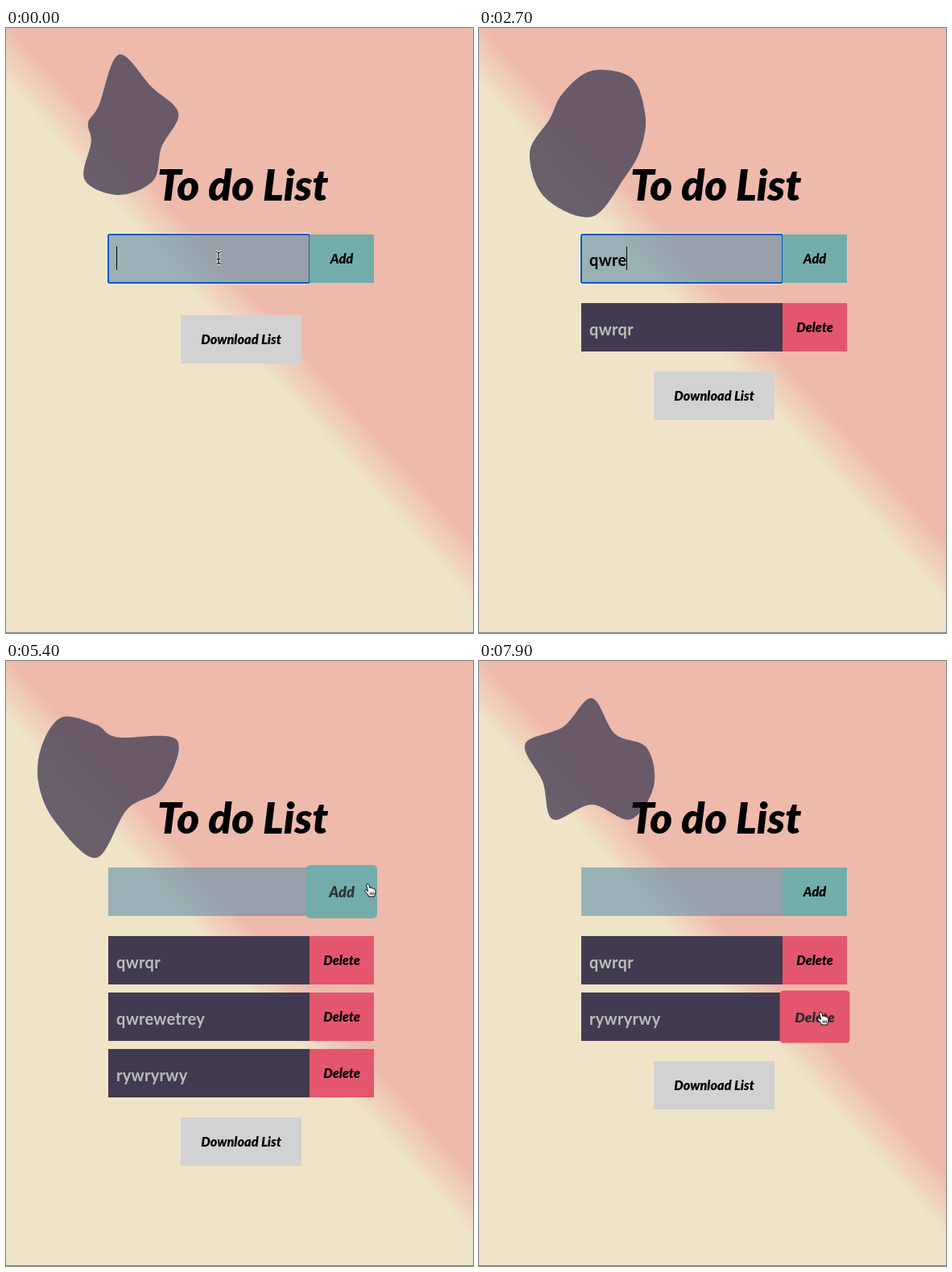
An HTML page for the animation above (8 s loop, 580 by 750 pixels).

```html
<!DOCTYPE html>
<html lang="en">
<head>
<meta charset="utf-8">
<title>To do List</title>
<style>
  html, body { margin: 0; width: 100%; height: 100%; overflow: hidden; }
  svg { display: block; width: 580px; height: 750px; }
  text { font-family: Lato, "Open Sans", sans-serif; font-weight: 700; }
  .title { font-size: 53px; font-weight: 900; font-style: italic; text-anchor: middle; }
  .label { font-size: 16.3px; font-weight: 900; font-style: italic; text-anchor: middle; }
  .entry { font-size: 20px; letter-spacing: .3px; }
</style>
</head>
<body>
<svg viewBox="0 0 580 750">
  <defs>
    <linearGradient id="sky" gradientUnits="userSpaceOnUse" x1="312" y1="337" x2="272" y2="373">
      <stop stop-color="#eebaac"/>
      <stop offset="1" stop-color="#f0e4c8"/>
    </linearGradient>
  </defs>
  <rect width="580" height="750" fill="url(#sky)"/>
  <rect y="749" width="580" height="1" fill="#85828b"/>
  <path id="blob" fill="rgb(82,73,92)" fill-opacity=".85"/>
  <text class="title" x="294" y="214">To do List</text>
  <rect x="127" y="256" width="250" height="60" fill="rgb(95,143,167)" fill-opacity=".6"/>
  <g id="ui"></g>
</svg>
<script>
const LOOP = 8000, TRAVEL = 350, FADE = 150, REMOVED = 7780;
const blob = document.getElementById('blob');
const ui = document.getElementById('ui');
const pen = document.createElement('canvas').getContext('2d');
pen.font = '700 20px Lato, "Open Sans", sans-serif';

// The blob is a ring of evenly spaced spokes, the first one pointing up.
const pose = (time, x, y, ...spokes) => ({ time, values: [x, y, ...spokes] });
const poses = [
  pose(0, 140, 130, 97, 70, 78, 56, 73, 77, 72, 36, 40, 42),
  pose(1400, 140, 130, 83, 95, 83, 72, 76, 68, 72, 45, 45, 43),
  pose(2700, 140, 130, 77, 84, 70, 64, 69, 104, 99, 81, 55, 61),
  pose(4000, 120, 140, 36, 85, 67, 70, 88, 52, 64, 58, 31, 28),
  pose(5400, 112, 130, 51, 44, 105, 87, 66, 114, 86, 75, 72, 74),
  pose(6900, 150, 140, 73, 68, 117, 112, 76, 54, 70, 95, 101, 61),
  pose(7900, 140, 130, 84, 49, 72, 81, 82, 48, 82, 64, 87, 60)
];

const jobs = [
  { text: 'qwrqr', focus: 0, start: 300, step: 150, submit: 1550 },
  { text: 'qwrewetrey', focus: 2120, start: 2270, step: 110, submit: 3640, removed: REMOVED },
  { text: 'rywryrwy', focus: 4150, start: 4250, step: 80, submit: 5320 }
];

// The pointer rests at each stop and leaves just in time for the next.
const stop = (arrive, x, y) => ({ arrive, x, y });
const stops = [
  stop(0, 264, 285), stop(1250, 388, 306), stop(2100, 300, 290), stop(3620, 410, 290),
  stop(4000, 323, 271), stop(5300, 452, 284), stop(6200, 291, 597), stop(7300, 427, 443)
];

const lerp = (a, b, u) => a + (b - a) * u;
const clamp = v => Math.max(0, Math.min(1, v));
const activeJob = t => jobs.find(j => t >= j.focus && t < j.submit);
const rowsAt = t => jobs.filter(j => t >= j.submit && t < (j.removed ?? LOOP));

function poseAt(t) {
  const last = poses.length - 1;
  if (t >= poses[last].time) return poses[last].values;
  const i = poses.findIndex((p, k) => t < poses[k + 1].time);
  const a = poses[i], b = poses[i + 1];
  const before = poses[Math.max(0, i - 1)], after = poses[Math.min(last, i + 2)];
  const span = b.time - a.time, u = (t - a.time) / span;
  return a.values.map((p, k) => {
    const q = b.values[k];
    const m = (q - before.values[k]) / (b.time - before.time) * span;
    const n = (after.values[k] - p) / (after.time - a.time) * span;
    return p + u * (m + u * (3 * (q - p) - 2 * m - n + u * (2 * (p - q) + m + n)));
  });
}

function blobPath([cx, cy, ...spokes]) {
  const count = spokes.length;
  const points = spokes.map((r, k) => {
    const angle = 2 * Math.PI * k / count;
    return [cx + r * Math.sin(angle), cy - r * Math.cos(angle)];
  });
  const at = k => points[(k + count) % count];
  const handle = (k, side) => at(k).map((v, j) => v + side * (at(k + 1)[j] - at(k - 1)[j]) / 6);
  return `M${at(0)}` + points.map((p, k) => `C${handle(k, 1)} ${handle(k + 1, -1)} ${at(k + 1)}`).join('') + 'Z';
}

function pointerAt(t) {
  const past = stops.filter(s => s.arrive <= Math.max(0, t));
  const from = past[past.length - 1], to = stops[past.length] ?? from;
  const u = clamp((t - to.arrive + TRAVEL) / TRAVEL), ease = u * u * (3 - 2 * u);
  const job = activeJob(t);
  return {
    x: lerp(from.x, to.x, ease),
    y: lerp(from.y, to.y, ease),
    hidden: job && t >= job.start && from.arrive <= job.start && t < to.arrive - TRAVEL
  };
}

function buttonsAt(t) {
  const rows = rowsAt(t);
  return [
    { id: 'add', label: 'Add', x: 417, y: 286, width: 80, color: '#72adab' },
    ...rows.map((row, i) =>
      ({ id: row.text, label: 'Delete', x: 417, y: 371 + 70 * i, width: 80, color: '#e4566e' })),
    { id: 'download', label: 'Download List', x: 292, y: 386 + 70 * rows.length, width: 150, color: '#d2d2d2' }
  ];
}

function hoveredAt(t) {
  const { x, y, hidden } = pointerAt(t);
  const hit = b => Math.abs(x - b.x) < b.width / 2 && Math.abs(y - b.y) < 30;
  return hidden ? undefined : buttonsAt(t).find(hit)?.id;
}

// Share of the last moments that the pointer spent on a button.
function hoverAmount(id, t) {
  const samples = 15;
  let hits = 0;
  for (let k = 0; k < samples; k++) hits += hoveredAt(t - FADE * k / samples) === id;
  return hits / samples;
}

function drawButton({ id, label, x, y, width, color }, t) {
  const hover = hoverAmount(id, t), shade = Math.round(51 * hover);
  return `<g transform="translate(${x} ${y}) scale(${1 + .1 * hover})">
    <rect x="${-width / 2}" y="-30" width="${width}" height="60" rx="${4.5 * hover}" fill="${color}"/>
    <text class="label" y="6" fill="rgb(${shade},${shade},${shade})">${label}</text></g>`;
}

function drawInput(t) {
  const job = activeJob(t);
  if (!job) return '';
  const count = Math.max(0, Math.min(job.text.length, Math.floor((t - job.start) / job.step) + 1));
  const typed = job.text.slice(0, count);
  const lastKey = count ? job.start + (count - 1) * job.step : job.focus;
  const caretX = Math.round(137 + pen.measureText(typed).width + count * .3);
  const caretOn = (t - lastKey) % 1060 < 530;
  return `<rect x="125.5" y="254.5" width="253" height="63" rx="3.5" fill="none" stroke="#fff" stroke-opacity=".7"/>
    <rect x="127" y="256" width="250" height="60" rx="2" fill="none" stroke="#0857c3" stroke-width="2"/>
    <text class="entry" x="137" y="295">${typed}</text>` +
    (caretOn ? `<rect x="${caretX}" y="271" width="1" height="29"/>` : '');
}

const drawRow = (row, i) =>
  `<rect x="127" y="${341 + 70 * i}" width="250" height="60" fill="#423a50"/>
  <text class="entry" x="137" y="${381 + 70 * i}" fill="#b9bfb6">${row.text}</text>`;

const beam = 'M-3.5-7.5Q0-7.5 0-5Q0-7.5 3.5-7.5M0-5V5M-2 1.5H2M-3.5 7.5Q0 7.5 0 5Q0 7.5 3.5 7.5';
const cursors = {
  beam: `<path d="${beam}" fill="none" stroke="#fff" stroke-width="3"/>
    <path d="${beam}" fill="none" stroke="#000" stroke-width="1.2"/>`,
  hand: `<path d="M-4-7C-2.8-8.6-1.5-7.6-1-6L0-2.5C1-3.8 2.4-3.2 2.7-2C3.8-2.8 4.8-2 5-1C6-1.5 6.8-.7 6.9.5
    C7.2 3 6.4 5 5.5 8H-1.5C-2 5.5-5 3.5-6.3 1.3C-6.9 0-5.2-.9-4 .3L-2.5 1.5L-4.2-5Z"
    fill="#fff" stroke="#000" stroke-linejoin="round"/>
    <path d="M.3 2.5V6M2.3 2.5V6M4.3 2.5V6" stroke="#000" stroke-width=".9"/>`,
  arrow: '<path d="M-5-8V6L-1.8 3L.3 8L2.6 7L.5 2.3H5Z" stroke="#fff" stroke-linejoin="round"/>'
};

function drawPointer(t) {
  const { x, y, hidden } = pointerAt(t);
  if (hidden) return '';
  const overInput = Math.abs(x - 252) < 125 && Math.abs(y - 286) < 30;
  const kind = hoveredAt(t) ? 'hand' : overInput ? 'beam' : 'arrow';
  return `<g transform="translate(${x} ${y})">${cursors[kind]}</g>`;
}

function draw(t) {
  blob.setAttribute('d', blobPath(poseAt(t)));
  ui.innerHTML = drawInput(t) + rowsAt(t).map(drawRow).join('') +
    buttonsAt(t).map(b => drawButton(b, t)).join('') + drawPointer(t);
}

let origin;
function tick(now) {
  origin ??= now;
  draw((now - origin) % LOOP);
  requestAnimationFrame(tick);
}
draw(0);
requestAnimationFrame(tick);
</script>
</body>
</html>
```
